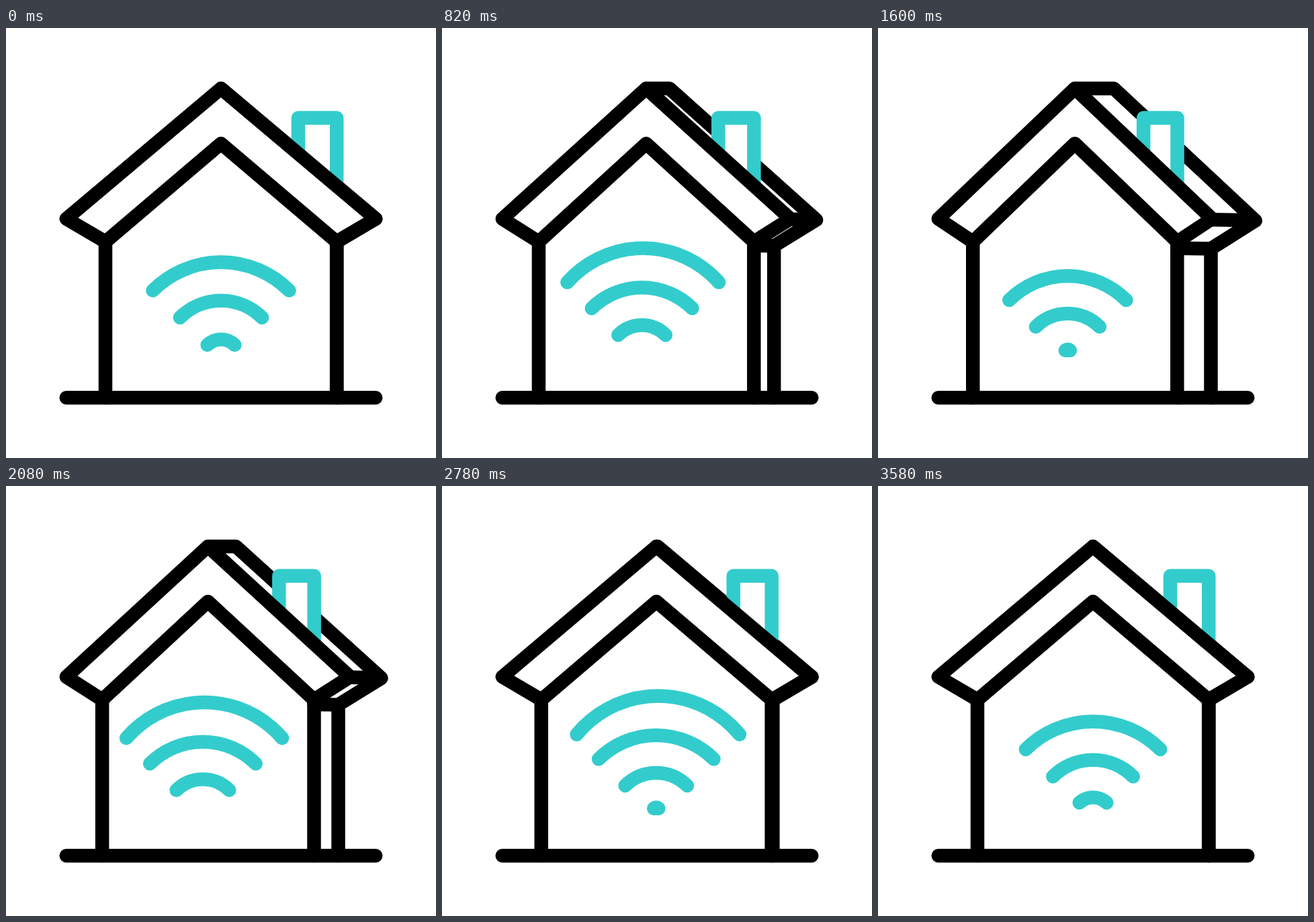
These frames come from a looping animation (640x640 px, 3600 ms). An HTML page with a canvas:

```html
<!DOCTYPE html>
<html lang="en">
<head>
<meta charset="utf-8">
<title>Smart home</title>
<style>
  html, body { margin: 0; width: 100%; height: 100%; overflow: hidden; background: #fff; }
  canvas { display: block; width: 640px; height: 640px; }
</style>
</head>
<body>
<canvas id="stage" width="640" height="640"></canvas>
<script>
const ctx = document.getElementById('stage').getContext('2d');
const LOOP = 3600, TURN = 1500, WAVE = 600, STEP = 20;
const BLACK = '#000', CYAN = '#33cccc', WHITE = '#fff';

const lerp = (a, b, k) => a + (b - a) * k;

// Cubic easing with handles (.5, 0) and (.5, 1), solved by bisection.
function ease(x) {
  let lo = 0, hi = 1;
  for (let i = 0; i < 24; i++) {
    const s = (lo + hi) / 2;
    if (1.5 * s * (1 - s) + s * s * s < x) lo = s; else hi = s;
  }
  return lo * lo * (3 - 2 * lo);
}

function turnAt(t) {
  if (t >= 2 * TURN) return 0;
  return ease(t < TURN ? t / TURN : 2 - t / TURN);
}

function line(points, color = BLACK, closed = false, fill = null) {
  ctx.beginPath();
  points.forEach(([x, y]) => ctx.lineTo(x, y));
  if (closed) ctx.closePath();
  if (fill) {
    ctx.fillStyle = fill;
    ctx.fill();
  }
  ctx.strokeStyle = color;
  ctx.stroke();
}

function drawHouse(p) {
  const apexX = 320 - 27.2 * p;
  const leftEave = [148 - 6.8 * p, 318.2];
  const rightEave = [492.2 - 47.2 * p, 318.2];
  const corner = [550.2 - 53.4 * p, 284];
  const backApex = [320 + 31.2 * p, 90];
  const backCorner = [550.2 + 11.7 * p, 284 + 2.7 * p];
  const backEave = [492.2 + 3.3 * p, 318.2 + 10.4 * p];

  // Receding side
  line([[apexX, 90], backApex, backCorner, backEave, [backEave[0], 550]]);
  line([[corner[0], 284 + 1.2 * p], [lerp(corner[0], backCorner[0], 0.9), 284 + 2.2 * p]]);
  line([[rightEave[0], 318.2 + 9.5 * p], backEave]);

  // Chimney standing on the front slope
  const slopeY = x => 90 + (x - apexX) * 194 / (corner[0] - apexX);
  const left = 435 - 40.1 * p, right = 492.2 - 47 * p;
  ctx.lineCap = 'butt';
  line([[left, slopeY(left)], [left, 133.8], [right, 133.8], [right, slopeY(right)]],
    CYAN, false, WHITE);
  ctx.lineCap = 'round';

  // Front face
  line([[apexX, 90], corner, rightEave, [apexX, 172], leftEave, [89.8, 284]], BLACK, true);
  line([leftEave, [leftEave[0], 550]]);
  line([rightEave, [rightEave[0], 550]]);
  line([[89.8, 550.2], [550.2, 550.2]]);
}

// Arc through both ends and the top of its curve.
function arch(x, half, top, end) {
  const sag = end - top;
  const r = (half * half + sag * sag) / (2 * sag);
  const a = Math.atan2(half, r - sag);
  ctx.beginPath();
  ctx.arc(x, top + r, r, -Math.PI / 2 - a, -Math.PI / 2 + a);
  ctx.strokeStyle = CYAN;
  ctx.stroke();
}

function ring(x, r) {
  const d = r * Math.SQRT1_2;
  arch(x, d, 492.2 - r, 492.2 - d);
}

function drawWaves(t, p) {
  const x = 320 - 37.9 * p;
  const phase = (t % WAVE) / WAVE;

  const born = Math.min(1, phase + (t > 2400 ? STEP / WAVE : 0));
  if (born >= 0.6) {
    const k = (born - 0.6) / 0.4;
    arch(x, lerp(0.2, 20.3, k), lerp(481.6, 463.5, k), lerp(481.8, 471.4, k));
  }

  ring(x, 28.8 + 57.6 * phase);
  ring(x, 86.4 + 57.4 * phase - 1.7 * Math.sin(Math.PI * phase));

  if (phase < 0.65) {
    const k = phase / 0.65;
    arch(x + 3 * k, lerp(101.5, 121.7, k), lerp(348.6, 311.5, k), lerp(390.8, 369.2, k));
  }
}

function draw(now) {
  const t = Math.floor((now % LOOP) / STEP) * STEP;
  const p = turnAt(t);
  ctx.fillStyle = WHITE;
  ctx.fillRect(0, 0, 640, 640);
  ctx.lineWidth = 20.5;
  ctx.lineCap = ctx.lineJoin = 'round';
  drawHouse(p);
  drawWaves(t, p);
}

let start = null;
function tick(now) {
  if (start === null) start = now;
  draw(now - start);
  requestAnimationFrame(tick);
}
draw(0);
requestAnimationFrame(tick);
</script>
</body>
</html>
```
